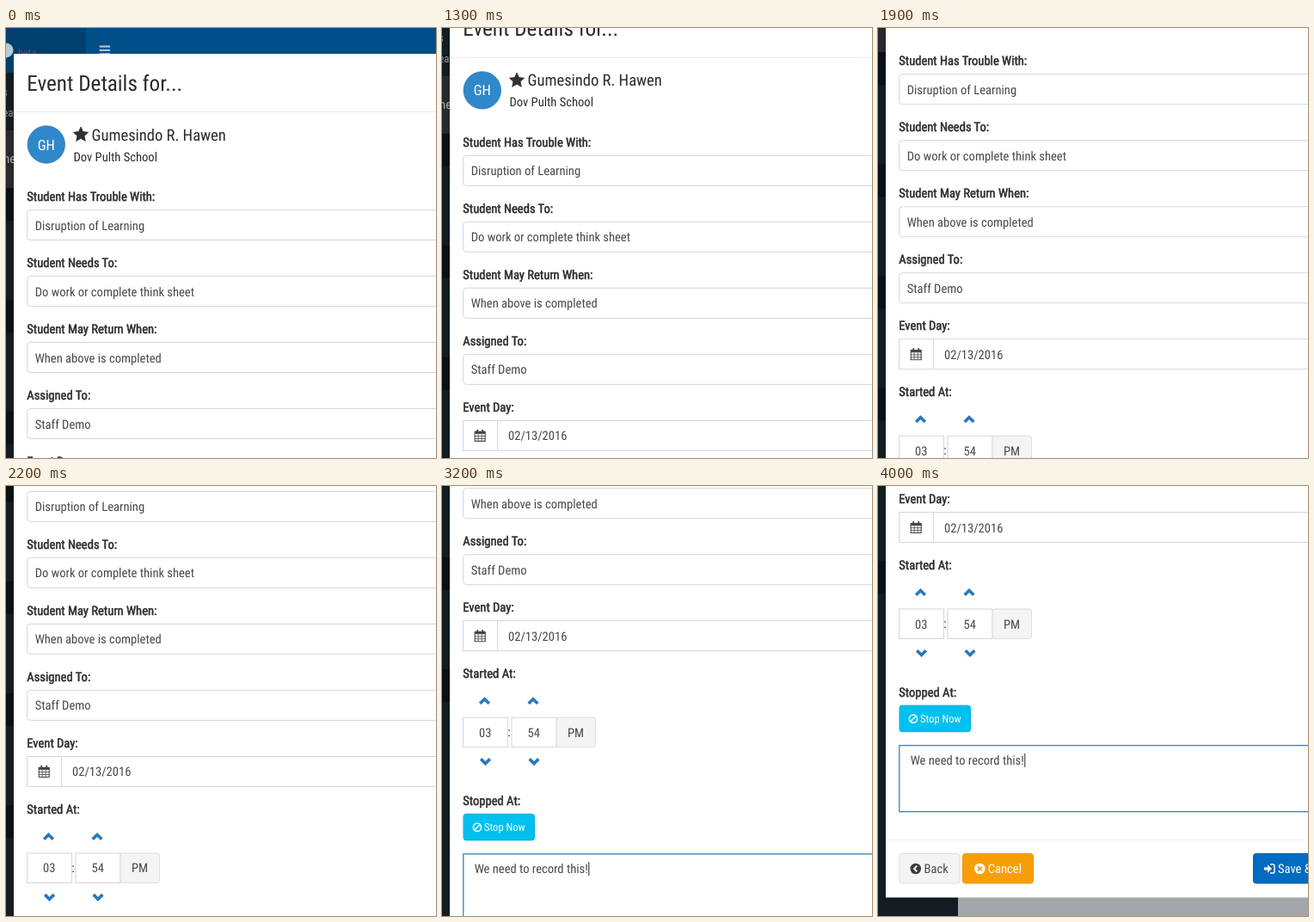
An HTML page for the animation above (5 s loop, 500 by 500 pixels).

```html
<!DOCTYPE html>
<html lang="en">
<head>
<meta charset="utf-8">
<title>Event form scroll</title>
<style>
  html, body { margin: 0; width: 100%; height: 100%; overflow: hidden; background: #fff; }
  svg { display: block; width: 100vw; height: 100vh; }
  text {
    font-family: "Roboto Condensed", Roboto, sans-serif;
    font-stretch: condensed;
    font-size: 14.6px;
    fill: #484848;
    white-space: pre;
    text-rendering: geometricPrecision;
  }
  .dark { fill: #2b2b2b; }
  .label { fill: #2b2b2b; stroke: #2b2b2b; stroke-width: .5; }
  .white { fill: #fff; }
  .mid { text-anchor: middle; }
  .end { text-anchor: end; }
  .box { fill: #fff; stroke: #d2d6de; }
  .grey { fill: #f4f4f4; stroke: #dcdcdc; }
</style>
</head>
<body>
<svg viewBox="0 0 500 500" xmlns="http://www.w3.org/2000/svg">
  <g id="page"></g>
</svg>
<script>
const NS = "http://www.w3.org/2000/svg";
const page = document.getElementById("page");
const LEFT = 24.3;

function add(tag, attrs, parent = page) {
  const el = document.createElementNS(NS, tag);
  for (const key in attrs) el.setAttribute(key, attrs[key]);
  parent.appendChild(el);
  return el;
}

const rect = (x, y, width, height, attrs) => add("rect", { x, y, width, height, ...attrs });
const circle = (cx, cy, r, attrs) => add("circle", { cx, cy, r, ...attrs });
const line = (d, stroke, width, attrs) =>
  add("path", { d, stroke, "stroke-width": width, fill: "none", ...attrs });

function text(str, x, y, cls = "", size, fill) {
  const el = add("text", { x, y, class: cls });
  el.textContent = str;
  if (size) el.style.fontSize = size + "px";
  if (fill) el.style.fill = fill;
  return el;
}

// One tracking value keeps the condensed look if only the regular width is installed.
function setTracking() {
  const sample = "When above is completed";
  const probe = text(sample, 0, 0, "", 100);
  const em = probe.getComputedTextLength() / 100;
  probe.remove();
  page.style.setProperty("--track", (10.08 - em) / sample.length);
  const rule = document.createElement("style");
  rule.textContent = "text { letter-spacing: calc(var(--track) * 1em); }";
  document.head.appendChild(rule);
}

function backdrop() {
  rect(0, 0, 500, 1000, { fill: "#a4a6aa" });
  rect(0, 0, 93, 1000, { fill: "#131c20" });
  rect(0, 119, 93, 67, { fill: "#29292d" });
  for (let i = 0; i < 4; i++) rect(0, 186 + i * 130, 93, 38, { fill: "#0b1013" });
  rect(0, 0, 500, 52, { fill: "#004f88" });
  rect(0, 0, 93, 52, { fill: "#003f6e" });
  circle(0, 26, 8.5, { fill: "#b9c9d6" });
  const beta = text("beta", 14, 33, "", 12.5, "#a04a62");
  beta.style.fontWeight = 300;
  beta.style.fontStretch = "normal";
  for (let i = 0; i < 3; i++) rect(108.7, 20.4 + i * 4.4, 12.4, 2.2, { fill: "#b3c2cf" });
  text("s", 2, 79, "end", 13, "#7d8588");
  text("ea", 8.5, 103, "end", 13, "#8f9698");
  text("me", 11, 157, "end", 14.6, "#aaaaac");
}

function star(cx, cy, r) {
  let pts = "";
  for (let i = 0; i < 10; i++) {
    const a = i * Math.PI / 5, q = i % 2 ? r * .48 : r;
    pts += `${cx + q * Math.sin(a)},${cy - q * Math.cos(a)} `;
  }
  add("polygon", { points: pts, fill: "#2d3035", stroke: "#2d3035", "stroke-width": .8, "stroke-linejoin": "round" });
}

function header() {
  rect(9, 30, 520, 937.5, { fill: "#fff" });
  text("Event Details for...", LEFT, 72.5, "dark", 25.2);
  rect(9, 97, 500, 1, { fill: "#ececec" });
  circle(46.8, 135.5, 21.7, { fill: "#3088cb", stroke: "#2b76b2", "stroke-width": .8 });
  text("GH", 46.8, 141.5, "white mid", 16.6);
  star(87, 124.1, 9);
  text("Gumesindo R. Hawen", 99.5, 130.5, "dark", 18.6);
  text("Dov Pulth School", 78.5, 154.5, "dark");
}

function field(i, label, value) {
  const y = 211.5 + i * 77;
  text(label, LEFT, y - 10.5, "label");
  rect(24.5, y, 520, 35, { class: "box", rx: 4 });
  text(value, 33.7, y + 23);
}

function calendar(x, y) {
  line(`M${x - 6} ${y - 4.5}h12v11h-12z`, "#444", 1.1);
  rect(x - 6, y - 5, 12, 3, { fill: "#444" });
  line(`M${x - 2} ${y - 2}v8M${x + 2} ${y - 2}v8M${x - 6} ${y + .7}h12M${x - 6} ${y + 3.6}h12`, "#444", .8);
  for (const dx of [-3, 3]) line(`M${x + dx} ${y - 7}v3.5`, "#444", 1.8);
}

function chevron(x, y, dir) {
  line(`M${x - 5.3} ${y + 2.8 * dir}L${x} ${y - 2.5 * dir}L${x + 5.3} ${y + 2.8 * dir}`, "#2878bd", 3.6);
}

function times() {
  text("Event Day:", LEFT, 509, "label");
  rect(24.5, 519.5, 520, 35, { class: "box" });
  line("M64.5 519.5v35", "#d2d6de", 1);
  calendar(44.2, 537);
  text("02/13/2016", 77, 542.5);

  text("Started At:", LEFT, 586, "label");
  [["03", 24.5], ["54", 81]].forEach(([value, x]) => {
    chevron(x + 25, 613, 1);
    rect(x, 632, 52, 34.5, { class: "box" });
    text(value, x + 25.7, 654.5, "mid");
    chevron(x + 26, 683, -1);
  });
  text(":", 76.3, 654, "dark");
  rect(133, 632, 45.5, 34.5, { class: "grey", rx: 3 });
  text("PM", 155.5, 654.5, "mid");

  text("Stopped At:", LEFT, 734, "label");
  rect(25, 744.2, 82.5, 30.5, { rx: 3, fill: "#00c0ef", stroke: "#00b2e0" });
  circle(41, 759.7, 4.6, { fill: "none", stroke: "#fff", "stroke-width": 1.5 });
  line("M37.8 762.9l6.4-6.4", "#fff", 1.5);
  text("Stop Now", 49, 764.2, "white", 12.6);
}

function note() {
  rect(24.8, 790.7, 520, 77, { fill: "#fff", stroke: "#3681bd", "stroke-width": 1.3 });
  text("We need to record this!", 37.7, 813);
  rect(170.3, 800, 1, 16, { fill: "#222" });
}

function footer() {
  rect(9, 900, 500, 1, { fill: "#f0f0f0" });
  const y = 934;
  rect(25, 916.5, 70, 34.5, { class: "grey", rx: 3 });
  circle(43.8, y, 6.3, { fill: "#3c3c3c" });
  line(`M45.3 ${y - 3.3}l-3.3 3.3l3.3 3.3`, "#fff", 1.8);
  text("Back", 53.5, 939);

  rect(98.5, 916.5, 82, 34.5, { rx: 3, fill: "#f79f05", stroke: "#ed9704" });
  circle(118.3, y, 6.3, { fill: "#fff" });
  line(`M115.9 ${y - 2.4}l4.8 4.8m0-4.8l-4.8 4.8`, "#f79f05", 1.9);
  text("Cancel", 127.8, 939, "white");

  rect(436.5, 916.5, 100, 34.5, { rx: 3, fill: "#006bc0", stroke: "#0060ac" });
  add("path", { d: `M449 ${y - 1.6}h4v-3.2l5 4.8l-5 4.8v-3.2h-4z`, fill: "#fff" });
  line(`M456 ${y - 5}h3.2q1.8 0 1.8 1.8v6.4q0 1.8-1.8 1.8h-3.2`, "#fff", 1.4);
  text("Save & Close", 465, 939, "white");
}

setTracking();
backdrop();
header();
field(0, "Student Has Trouble With:", "Disruption of Learning");
field(1, "Student Needs To:", "Do work or complete think sheet");
field(2, "Student May Return When:", "When above is completed");
field(3, "Assigned To:", "Staff Demo");
times();
note();
footer();

// Rest one second, scroll in equal 100 ms steps, rest until the loop ends.
const LOOP = 5000, REST = 1000, STEP = 100, STEPS = 31, DISTANCE = 489;

function draw(t) {
  const n = t < REST ? 0 : Math.min(STEPS, Math.floor((t - REST) / STEP) + 1);
  page.setAttribute("transform", `translate(0 ${-DISTANCE * n / STEPS})`);
}

const start = performance.now();
function tick() {
  draw((performance.now() - start) % LOOP);
  requestAnimationFrame(tick);
}
tick();
</script>
</body>
</html>
```
